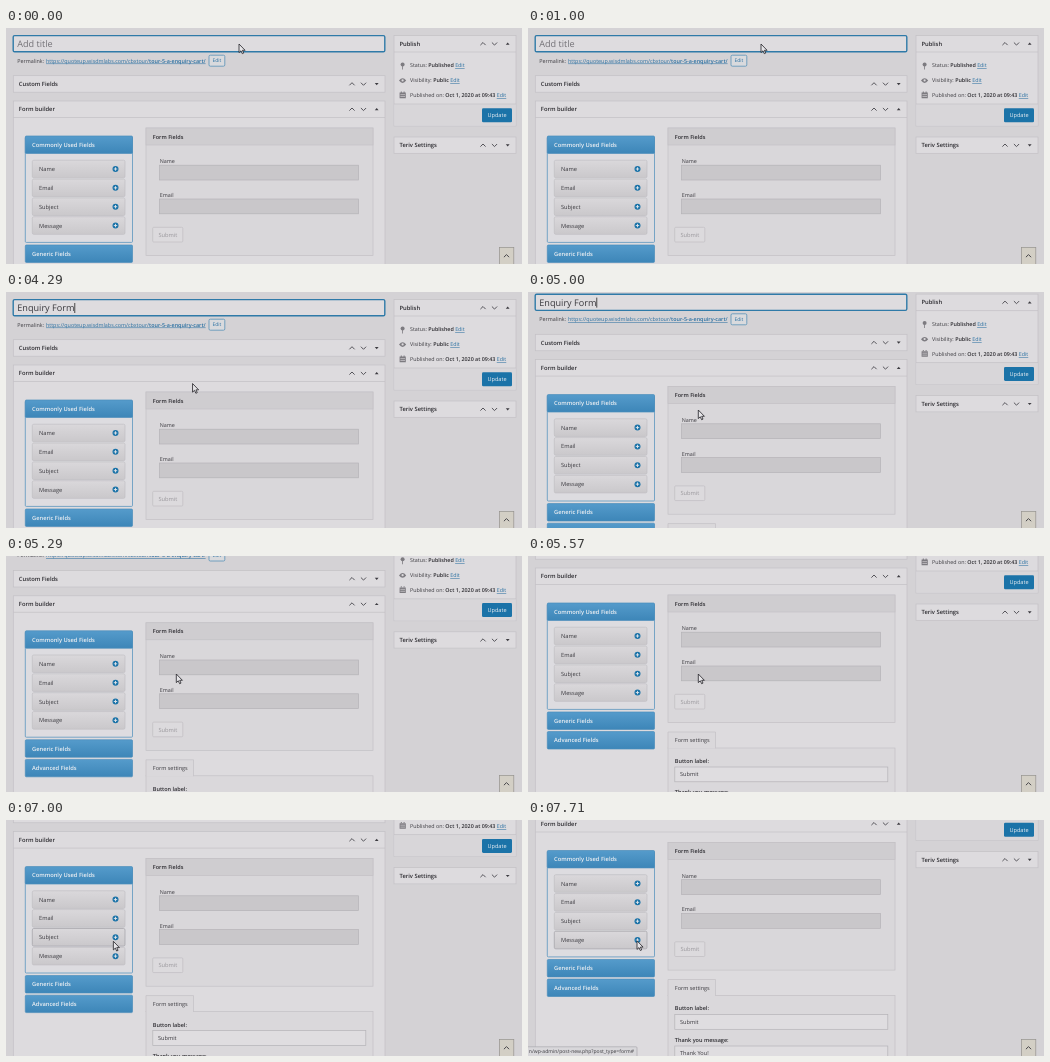
Write an HTML page that moves like this. It is 516 px wide and 236 px high and loops after 8 s.

```html
<!DOCTYPE html>
<html lang="en">
<head>
<meta charset="utf-8">
<title>Form editor</title>
<style>
  html, body { margin: 0; width: 100%; height: 100%; overflow: hidden; background: #d4d2d5; }
  svg { display: block; width: 516px; height: 236px; }
  text { font-family: "Open Sans", "Noto Sans", sans-serif; fill: #3c3b40; text-rendering: geometricPrecision; white-space: pre; }
  .b { font-weight: 600; fill: #2b2a2f; }
  .w { fill: #eef0f3; }
  .link { fill: #2a70a2; text-decoration: underline; }
  .dim { fill: #9a989c; }
</style>
</head>
<body>
<svg id="stage" viewBox="0 0 516 236" xmlns="http://www.w3.org/2000/svg"></svg>
<script>
const TICKS_PER_SECOND = 7, LOOP_TICKS = 56;
const PANEL = '#dddbde', LINE = '#c3c1c5', FIELD = '#c9c7ca', BLUE = '#1b73a8';

const box = (x, y, r, b, fill, stroke = 'none', extra = '') =>
  `<rect x="${x}" y="${y}" width="${r - x}" height="${b - y}" fill="${fill}" stroke="${stroke}" stroke-width=".7" ${extra}/>`;
const text = (x, mid, size, str, cls = '', extra = '') =>
  `<text x="${x}" y="${mid + size * 0.36}" font-size="${size}" class="${cls}" ${extra}>${str}</text>`;
const span = (str, cls) => `<tspan class="${cls}">${str}</tspan>`;
const stroke = (d, color, width) =>
  `<path d="${d}" fill="none" stroke="${color}" stroke-width="${width}"/>`;
const rule = (x, r, y) => stroke(`M${x} ${y}H${r}`, LINE, 0.7);

// Up, down and toggle marks at the right of a panel header
function handles(x, y, open) {
  const s = open ? -1 : 1;
  return stroke(`M${x - 2.6} ${y + 1.3}l2.6-2.6 2.6 2.6M${x + 8.9} ${y - 1.3}l2.6 2.6 2.6-2.6`, '#55545a', 1) +
    `<path d="M${x + 22.8} ${y - s}h3.8l-1.9 ${2.2 * s}z" fill="#3c3b40"/>`;
}

function panel(x, y, r, b, title, open) {
  return box(x, y, r, b, PANEL, LINE) + text(x + 5.5, y + 8.3, 5.8, title, 'b') +
    handles(r - 33, y + 8.3, open) + (open ? rule(x, r, y + 16.5) : '');
}

const blueBar = (y, title) =>
  box(19.3, y, 126.5, y + 17.4, 'url(#blue)', '#4a8dbb', 'rx="1"') + text(26, y + 8.8, 5.75, title, 'b w');

const rowMid = i => 141 + i * 18.85;
const fieldRow = (name, i) => {
  const y = rowMid(i);
  return box(26.3, y - 8.8, 119, y + 8.8, 'url(#grey)', '#c1bfc3', 'rx="1.5" class="row"') +
    text(33, y, 5.7, name) +
    `<circle cx="109.5" cy="${y}" r="3" fill="${BLUE}"/>` +
    stroke(`M107.8 ${y}h3.4M109.5 ${y - 1.7}v3.4`, '#e4e6ea', 0.9);
};

const publishLine = (y, label, value) =>
  text(404, y, 5.35, `${label} ${span(value, 'b')} ${span('Edit', 'link')}`);

function publishPanel() {
  return panel(388, 7.5, 510, 98, 'Publish', true) +
    box(388.3, 76, 509.7, 97.7, '#d8d6d9') + rule(388, 510, 76) +
    `<g fill="#7d7b80"><circle cx="396.6" cy="36.4" r="2"/><path d="M396.2 38h.8v3.4h-.8z"/>
      <path d="M393 52.6q3.6-4.6 7.2 0q-3.6 4.6-7.2 0z"/><path d="M393.6 64.6h6.2v5.6h-6.2zM394.8 63.5h1v1h-1zM397.6 63.5h1v1h-1z"/></g>
      <circle cx="396.6" cy="52.4" r="1.1" fill="${PANEL}"/>` +
    stroke('M394.4 66.6h4.6M394.4 68.5h4.6', PANEL, 0.6) +
    publishLine(37.5, 'Status:', 'Published') +
    publishLine(52.5, 'Visibility:', 'Public') +
    publishLine(67.5, 'Published on:', 'Oct 1, 2020 at 09:43') +
    box(476, 80.3, 506, 94.3, BLUE, 'none', 'rx="1.3"') + text(491, 87.2, 5.55, 'Update', 'w', 'text-anchor="middle"');
}

function formPreview() {
  const field = (name, y) => text(153.8, y - 4, 5.4, name) + box(153.5, y, 352.5, y + 14.8, FIELD, '#b5b3b7');
  return box(140, 100, 367, 227.6, '#d9d7da', LINE) + box(140, 100, 367, 117, '#cfcdd0', LINE) +
    text(146.8, 108.6, 5.5, 'Form Fields', 'b') +
    field('Name', 137.2) + field('Email', 171) +
    box(146.7, 199.3, 176.8, 214, '#dcdadd', '#c0bec2', 'rx="1"') +
    text(161.8, 206.7, 5.7, 'Submit', 'dim', 'text-anchor="middle"');
}

function formSettings() {
  const setting = (y, label, value) => text(146.8, y, 5.5, label, 'b') +
    box(146.8, y + 6, 359.8, y + 20.8, '#dfdde0', '#b5b3b7') + text(152, y + 13.3, 5.6, value);
  return box(140, 253, 367, 420, '#dad8db', LINE) +
    `<path d="M140 253.4V237H187.5V253.4" fill="#dad8db" stroke="${LINE}" stroke-width=".7"/>` +
    text(146.8, 245.2, 5.5, 'Form settings') +
    setting(266, 'Button label:', 'Submit') + setting(297.5, 'Thank you message:', 'Thank You!');
}

const page =
  box(7.2, 7.6, 378.8, 23.8, '#dedcdf', '#2f7aa8', 'rx="1.4" style="stroke-width:1.4"') +
  text(11.3, 16.1, 9.1, '', '', 'id="title"') + '<rect id="caret" y="11" width=".8" height="10" fill="#222"/>' +
  text(11.3, 32.6, 5.4, 'Permalink:') +
  text(40, 32.6, 5.38, span('https://quoteup.wisdmlabs.com/cbxtour/', 'link') +
    `<tspan class="link" font-weight="600">tour-5-a-enquiry-cart/</tspan>`) +
  box(203, 27.2, 218.8, 38.2, '#d9dadd', '#4788b2', 'rx="1.3"') +
  text(210.9, 32.7, 4.9, 'Edit', '', 'text-anchor="middle" style="fill:#2a70a2"') +
  panel(7.3, 47.7, 379, 64.2, 'Custom Fields', false) +
  panel(7.3, 73, 379, 440, 'Form builder', true) +
  box(19.3, 109, 126.5, 214.4, '#dddce0', '#4a8dbb', 'rx="1"') +
  blueBar(108, 'Commonly Used Fields') +
  ['Name', 'Email', 'Subject', 'Message'].map(fieldRow).join('') +
  blueBar(217, 'Generic Fields') + blueBar(236.6, 'Advanced Fields') +
  formPreview() + formSettings() +
  publishPanel() + panel(388, 109, 510, 125.3, 'Teriv Settings', false);

const overlay =
  box(493.4, 219.5, 507.8, 237, '#d3cfc5', '#95938e') + stroke('M497.9 229.2l2.6-2.6 2.6 2.6', '#47464a', 1) +
  `<g id="status">${box(-2, 226.8, 109, 238, '#d8d7da', '#aaa8ac', 'rx="1"')}${
    text(106, 231.6, 5.05, 'n/wp-admin/post-new.php?post_type=form#', '', 'text-anchor="end"')}</g>` +
  '<path id="pointer" d="M0 0V8.6L2 6.8L3.3 9.7L4.7 9.1L3.4 6.3H6.1Z" fill="#e6e5e8" stroke="#222126" stroke-width=".8"/>';

const gradient = (id, top, bottom) =>
  `<linearGradient id="${id}" x2="0" y2="1"><stop stop-color="${top}"/><stop offset="1" stop-color="${bottom}"/></linearGradient>`;

const stage = document.getElementById('stage');
stage.innerHTML = `<defs>${gradient('blue', '#559bcb', '#3d86b8')}${gradient('grey', '#dad8db', '#cac8cb')}</defs>
  ${box(0, 0, 516, 236, '#d4d2d5')}<g id="page">${page}</g>${overlay}`;

const el = id => document.getElementById(id);
const [pageEl, title, caret, status, pointer] = ['page', 'title', 'caret', 'status', 'pointer'].map(el);
const rows = [...document.querySelectorAll('.row')];

// Rows of [tick, value...]
const TYPED = [[0, ''], [13, 'E'], [14, 'Enq'], [15, 'Enqu'], [16, 'Enquir'], [17, 'Enquiry'],
  [21, 'Enquiry F'], [22, 'Enquiry Fo'], [25, 'Enquiry For'], [26, 'Enquiry Form']];
const CARET = [[0, 0], [3, 1], [7, 0], [11, 1]];
const SCROLL = [[0, 0], [34, 0], [35, 5.4], [39, 61], [40, 61.4], [52, 61.4], [54, 77.5]];
const POINTER = [[0, 233, 16], [26, 233, 16], [32, 170.3, 118], [40, 170.3, 118],
  [47, 105.7, 121.8], [48, 105.7, 121.8], [50, 109, 120.8]];
const STATUS_TICK = 50;

const held = (keys, k) => keys.filter(row => row[0] <= k).pop()[1];
const linear = u => u, smooth = u => u * u * (3 - 2 * u);

function between(keys, k, ease) {
  const i = keys.findIndex(row => row[0] > k);
  if (i < 0) return keys[keys.length - 1].slice(1);
  const a = keys[i - 1], b = keys[i], u = ease((k - a[0]) / (b[0] - a[0]));
  return a.slice(1).map((v, j) => v + (b[j + 1] - v) * u);
}

function draw(k) {
  const [scroll] = between(SCROLL, k, linear), [x, y] = between(POINTER, k, smooth);
  const typed = held(TYPED, k);
  title.textContent = typed || 'Add title';
  title.style.fill = typed ? '#39383d' : '#747277';
  caret.setAttribute('x', 11.3 + (typed ? title.getComputedTextLength() : 0));
  caret.style.opacity = held(CARET, k);
  pageEl.setAttribute('transform', `translate(0 ${-scroll})`);
  pointer.setAttribute('transform', `translate(${x} ${y})`);
  status.style.opacity = k >= STATUS_TICK ? 1 : 0;
  rows.forEach((row, i) => {
    const over = x > 26 && x < 119 && Math.abs(y + scroll - rowMid(i)) < 8.8;
    row.setAttribute('stroke', over ? '#a3a1a6' : '#c1bfc3');
  });
}

const start = performance.now();
function loop(now) {
  const ticks = Math.max(0, now - start) * TICKS_PER_SECOND / 1000;
  draw(Math.floor(ticks + 0.03) % LOOP_TICKS);
  requestAnimationFrame(loop);
}
draw(0);
requestAnimationFrame(loop);
</script>
</body>
</html>
```
